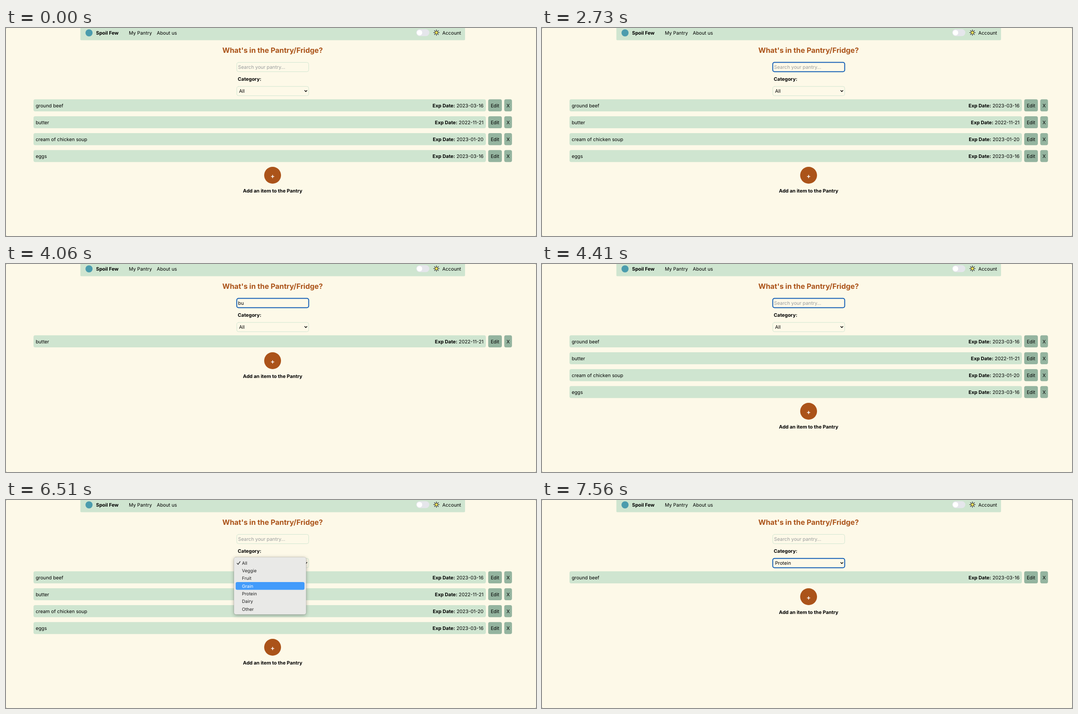
An HTML page with a canvas for the animation above (8000 ms loop, 1195 by 469 pixels).

```html
<!DOCTYPE html>
<html lang="en">
<head>
<meta charset="utf-8">
<title>Pantry search</title>
<style>
  html, body { margin: 0; width: 100%; height: 100%; overflow: hidden; background: #fdf9e8; }
  canvas { display: block; width: 1195px; height: 469px; }
</style>
</head>
<body>
<canvas id="stage"></canvas>
<script>
const W = 1195, H = 469, LOOP = 8000;
const BG = '#fdf9e8', MINT = '#cfe5d0', SAGE = '#94b49f', RUST = '#ab5319', FOCUS = '#0f5cb5';
const SIZE = 10.77, BOLD = { size: 10.9, weight: 700 };

const canvas = document.getElementById('stage');
const ctx = canvas.getContext('2d');
const dpr = window.devicePixelRatio || 1;
canvas.width = Math.round(W * dpr);
canvas.height = Math.round(H * dpr);
ctx.textRendering = 'geometricPrecision';

const pantry = [
  { name: 'ground beef', date: '2023-03-16', kind: 'Protein' },
  { name: 'butter', date: '2022-11-21', kind: 'Dairy' },
  { name: 'cream of chicken soup', date: '2023-01-20', kind: 'Other' },
  { name: 'eggs', date: '2023-03-16', kind: 'Dairy' }
];
const kinds = ['All', 'Veggie', 'Fruit', 'Grain', 'Protein', 'Dairy', 'Other'];

// Timelines: [start in ms, value]
const queries = [[0, ''], [2940, 'b'], [3080, 'bu'], [3290, 'but'], [3500, 'butt'],
  [3920, 'but'], [3990, 'bu'], [4270, 'b'], [4410, '']];
const carets = [[0, false], [1190, true], [1680, false], [2240, true], [2730, false],
  [2940, true], [4060, false], [4550, true], [5040, false], [5600, true], [5740, false]];
const hovers = [[0, 0], [6370, 1], [6440, 2], [6510, 3], [6650, 4], [7140, -1], [7210, 4]];
const menuAlphas = [[0, 0], [5740, 1], [7280, 0.7], [7350, 0.4], [7420, 0.15], [7490, 0]];
const choices = [[0, 'All'], [7350, 'Protein']];

function at(track, t) {
  let value = track[0][1];
  for (const [start, v] of track) if (t >= start) value = v;
  return value;
}

function box(x, y, w, h, r, fill) {
  ctx.beginPath();
  ctx.roundRect(x, y, w, h, r);
  ctx.fillStyle = fill;
  ctx.fill();
}

function frame(x, y, w, h, r, color, line) {
  ctx.beginPath();
  ctx.roundRect(x, y, w, h, r);
  ctx.strokeStyle = color;
  ctx.lineWidth = line;
  ctx.stroke();
}

function disc(x, y, r, fill) {
  ctx.beginPath();
  ctx.arc(x, y, r, 0, Math.PI * 2);
  ctx.fillStyle = fill;
  ctx.fill();
}

function path(points, color, line) {
  ctx.beginPath();
  points.forEach(([x, y], i) => i ? ctx.lineTo(x, y) : ctx.moveTo(x, y));
  ctx.strokeStyle = color;
  ctx.lineWidth = line;
  ctx.stroke();
}

// Draws text centred vertically on its capitals and returns its width.
function text(str, x, mid, { size = SIZE, weight = 400, color = '#000', align = 'left' } = {}) {
  ctx.font = `${weight} ${size}px Inter, sans-serif`;
  ctx.fillStyle = color;
  ctx.textAlign = align;
  ctx.fillText(str, x, mid + size * 0.364);
  return ctx.measureText(str).width;
}

function drawSun(x, y) {
  ctx.lineCap = 'round';
  for (let i = 0; i < 8; i++) {
    const a = i * Math.PI / 4, c = Math.cos(a), s = Math.sin(a);
    path([[x + c * 5, y + s * 5], [x + c * 6.3, y + s * 6.3]], '#1c1c1c', 1.3);
  }
  disc(x, y, 3.8, '#1c1c1c');
  disc(x, y, 2.8, '#f5e05a');
}

function drawNav() {
  box(167.7, -4, 867.3, 31.4, 2, MINT);
  disc(187.2, 11, 8, '#4b9cad');
  text('Spoil Few', 203, 11.2, BOLD);
  text('My Pantry', 277, 11.2);
  text('About us', 340, 11.2);
  box(925, 2.7, 29.5, 15.6, 7.8, '#e5e6eb');
  disc(932.4, 10.6, 6.1, '#fff');
  drawSun(970.5, 10.4);
  text('Account', 983.7, 11.2);
}

function drawField(y, focused) {
  frame(520.3, y, 162.2, 20.9, 4, focused ? FOCUS : MINT, focused ? 2 : 1);
}

function drawSearch(query, focused, caret) {
  drawField(77.6, focused);
  const x = 523.3, mid = 88.2;
  const w = query ? text(query, x, mid) : 0;
  if (!query) text('Search your pantry...', x, mid, { color: '#989c9d' });
  if (caret) {
    ctx.fillStyle = '#000';
    ctx.fillRect(x + w + (query ? 0 : 0.6), 81.3, 1, 12.7);
  }
}

function drawSelect(choice, focused) {
  drawField(131.8, focused);
  text(choice, 525.4, 142.4);
  ctx.lineCap = 'round';
  path([[673.5, 140.8], [676, 143.4], [678.5, 140.8]], '#000', 1.5);
}

function drawRow(item, i) {
  const y = 160.8 + 38.15 * i, mid = y + 13.8, h = 27.1;
  box(62, y, 1020, h, 4, MINT);
  box(1087.2, y, 30.8, h, 4, SAGE);
  box(1123.4, y, 17.4, h, 4, SAGE);
  text(item.name, 66.9, mid);
  const w = text(item.date, 1076.6, mid, { align: 'right' });
  const gap = ctx.measureText(' ').width;
  text('Exp Date:', 1076.4 - w - gap, mid, { ...BOLD, align: 'right' });
  text('Edit', 1102.5, mid, { align: 'center' });
  text('X', 1132.1, mid, { align: 'center' });
}

function drawAdd(count) {
  const y = 180 + 38 * count;
  disc(601.1, y, 19, RUST);
  text('+', 601.1, y + 1.5, { size: 14.5, weight: 600, color: '#fff', align: 'center' });
  text('Add an item to the Pantry', 601.2, y + 35.2, { ...BOLD, align: 'center' });
}

function drawMenu(hover, alpha) {
  ctx.save();
  ctx.globalAlpha = alpha;
  ctx.shadowColor = 'rgba(0, 0, 0, 0.3)';
  ctx.shadowBlur = 8 * dpr;
  ctx.shadowOffsetY = 2 * dpr;
  box(514, 129, 162.7, 129, 4.5, '#e9e9e7');
  ctx.shadowColor = 'transparent';
  frame(513.8, 128.8, 163.1, 129.4, 4.7, 'rgba(0, 0, 0, 0.2)', 0.6);
  kinds.forEach((kind, i) => {
    const mid = 141.9 + 17.33 * i;
    const color = i === hover ? '#fff' : '#222';
    if (i === hover) box(517.8, mid - 8.8, 155.2, 17.4, 3.5, '#429bfb');
    text(kind, 532, mid, { size: 10.1, color });
    if (i === 0) path([[521, 142.6], [523.3, 145.2], [527.8, 138.8]], color, 1.4);
  });
  ctx.restore();
}

function drawCorners() {
  ctx.fillStyle = '#8d8b82';
  for (const x of [0, W - 1]) for (const y of [0, H - 1]) ctx.fillRect(x, y, 1, 1);
}

function draw(t) {
  const query = at(queries, t), choice = at(choices, t), alpha = at(menuAlphas, t);
  const shown = pantry.filter(p => p.name.includes(query) && (choice === 'All' || p.kind === choice));
  ctx.setTransform(dpr, 0, 0, dpr, 0, 0);
  ctx.fillStyle = BG;
  ctx.fillRect(0, 0, W, H);
  drawNav();
  text("What's in the Pantry/Fridge?", 601.1, 50, { size: 16.3, weight: 700, color: RUST, align: 'center' });
  drawSearch(query, t >= 1190 && t < 5740, at(carets, t));
  text('Category:', 522.5, 115.2, BOLD);
  drawSelect(choice, choice !== 'All');
  shown.forEach(drawRow);
  drawAdd(shown.length);
  if (alpha) drawMenu(at(hovers, t), alpha);
  drawCorners();
}

function tick() {
  draw(performance.now() % LOOP);
  requestAnimationFrame(tick);
}
tick();
</script>
</body>
</html>
```
